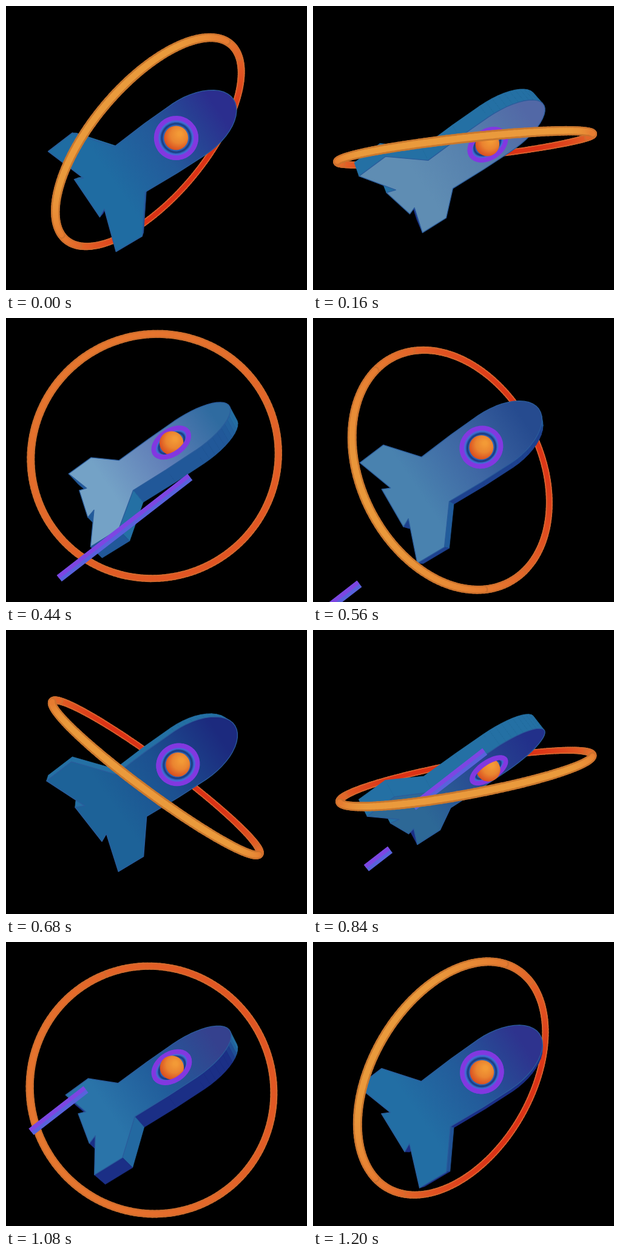
Recreate the animation shown at these times as an HTML page with a canvas. Size 496 px wide and 468 px high, loop 1240 ms.

```html
<!DOCTYPE html>
<html lang="en">
<head>
<meta charset="utf-8">
<title>Rocket</title>
<style>
html, body { margin: 0; height: 100%; overflow: hidden; background: #000; }
canvas { display: block; }
</style>
</head>
<body>
<canvas id="stage" width="496" height="468"></canvas>
<script>
const ctx = document.getElementById('stage').getContext('2d');
const LOOP = 1240, STEP = 40, DEPTH = 800, EYE = [251, 238];
const HALF_THICK = 16, RING_RADIUS = 205;

// Vectors and colours
const clamp = x => Math.max(0, Math.min(1, x));
const sum = (...terms) => [0, 1, 2].map(i => terms.reduce((acc, [k, v]) => acc + k * v[i], 0));
const unit = v => sum([1 / Math.hypot(...v), v]);
const cross = (a, b) => [a[1] * b[2] - a[2] * b[1], a[2] * b[0] - a[0] * b[2], a[0] * b[1] - a[1] * b[0]];
const rgb = hex => [1, 3, 5].map(i => parseInt(hex.slice(i, i + 2), 16));
const mix = (a, b, k) => `rgb(${rgb(a).map((c, i) => Math.round(c + (rgb(b)[i] - c) * k))})`;

function project([x, y, z]) {
  const k = DEPTH / (DEPTH - z);
  return [EYE[0] + (x - EYE[0]) * k, EYE[1] + (y - EYE[1]) * k, z, k];
}
const area = pts => pts.reduce((acc, p, i) => {
  const q = pts[(i + 1) % pts.length];
  return acc + p[0] * q[1] - q[0] * p[1];
}, 0);

function trace(pts, close) {
  ctx.beginPath();
  pts.forEach(p => ctx.lineTo(p[0], p[1]));
  if (close) ctx.closePath();
}
function fill(pts, style) {
  trace(pts, true);
  ctx.fillStyle = style;
  ctx.fill();
}
function stroke(pts, style, width, close) {
  trace(pts, close);
  ctx.strokeStyle = style;
  ctx.lineWidth = width;
  ctx.stroke();
}

// Rocket: flat outline (along the axis, across it), extruded and spun about the axis
const CENTER = [280.4, 217.4, 0];
const AXIS = [.828, -.56, .05], ACROSS = [.56, .828, 0], TOWARD = [-.041, .028, 1];
const side = [[-179, 38], [-165, 31], [-189, 101], [-138, 103.7], [-92.6, 45.5], [-30, 49]];
for (let i = 0; i < 12; i++) {
  const a = i / 12 * Math.PI / 2;
  side.push([25 + 88 * Math.sin(a), 50 * Math.cos(a)]);
}
const OUTLINE = [...side, [113, 0], ...side.map(([s, t]) => [s, -t]).reverse()]
  .map(p => p.map(c => c * .98));

// time, then face colour at fins, body and nose
const FACE = [
  [0, '#1f6ca2', '#235a9a', '#2b2e8e'],
  [280, '#8fa6c0', '#7d9cbc', '#6f94b8'],
  [440, '#74a2c6', '#6280b8', '#2f6ba0'],
  [680, '#1d6298', '#1c5090', '#1c2a7e'],
  [840, '#2d6896', '#284c92', '#22308a'],
  [1000, '#2f78ac', '#205e9c', '#3a4a8e'],
  [1240, '#1f6ca2', '#235a9a', '#2b2e8e']
];
function faceColours(t) {
  const i = FACE.findIndex(key => key[0] > t);
  const [a, b] = [FACE[i - 1], FACE[i]];
  const k = (t - a[0]) / (b[0] - a[0]);
  return [1, 2, 3].map(j => mix(a[j], b[j], k));
}

function drawRocket(t) {
  const angle = 2 * Math.PI * t / LOOP, c = Math.cos(angle), sn = Math.sin(angle);
  const wide = sum([c, ACROSS], [-sn, TOWARD]);
  const normal = sum([sn, ACROSS], [c, TOWARD]);
  const place = (s, w, h) => project(sum([1, CENTER], [s, AXIS], [w, wide], [h, normal]));
  const face = h => OUTLINE.map(([s, w]) => place(s, w, h));
  const front = face(HALF_THICK), back = face(-HALF_THICK);
  const facing = area(front) < 0 ? 1 : -1;

  function drawWindow(dir) {
    const near = sn > 0 ? -1 : 1;
    const arc = (r, h, from, to) => Array.from({ length: 41 }, (_, i) => {
      const a = (from + i / 40 * (to - from)) * Math.PI;
      return place(r * Math.cos(a), near * r * Math.sin(a), dir * h);
    });
    const circle = (r, h) => arc(r, h, 0, 2);
    fill(circle(33, 17), '#2a62b4');
    stroke(circle(23, 17), '#1c3f88', 3, true);
    stroke(circle(28, 18), '#4a66d8', 4, true);
    stroke(circle(32, 19), '#8238e0', 7.5, true);

    // Only the part of the ball outside the hull shows
    const [x, y, , k] = place(0, 0, dir * 17), r = 19.5 * k;
    const shade = ctx.createRadialGradient(x + 6, y - 7, 3, x + 3, y - 3, r * 1.35);
    shade.addColorStop(0, '#f39a36');
    shade.addColorStop(.45, '#ea8430');
    shade.addColorStop(1, '#d5401c');
    ctx.save();
    trace([...arc(32, 18, 0, 1), ...arc(32, 80, 1, 2)], true);
    ctx.clip();
    ctx.beginPath();
    ctx.arc(x, y, r, 0, 7);
    ctx.fillStyle = shade;
    ctx.fill();
    ctx.restore();
    stroke(arc(32, 20, 0, 1), '#8238e0', 7.5);
  }

  drawWindow(-facing);

  const glow = clamp(1 - Math.abs(t - 400) / 250);
  OUTLINE.map((p, i) => {
    const j = (i + 1) % OUTLINE.length, q = OUTLINE[j];
    const out = unit(sum([p[1] - q[1], AXIS], [q[0] - p[0], wide]));
    return {
      pts: [front[j], front[i], back[i], back[j]],
      z: front[i][2] + front[j][2] + back[i][2] + back[j][2],
      colour: mix('#2470a4', '#1b2f86', clamp(.3 + out[1] * 2.5) * (1 - .75 * glow))
    };
  }).filter(q => area(q.pts) < 0).sort((a, b) => a.z - b.z).forEach(q => {
    fill(q.pts, q.colour);
    stroke(q.pts, q.colour, .8, true);
  });

  const tail = place(-170, 0, 0), nose = place(110, 0, 0);
  const tint = ctx.createLinearGradient(tail[0], tail[1], nose[0], nose[1]);
  faceColours(t).forEach((colour, i) => tint.addColorStop([.15, .5, .9][i], colour));
  const shown = facing > 0 ? front : back;
  fill(shown, tint);
  stroke(shown, '#2a5c9c', 1.3, true);
  drawWindow(facing);
}

// Ring: its plane normal over half a loop; the other half mirrors it vertically
const TILT = [
  [-40, .68, .4, .61], [0, .69, .58, .43], [60, .59, .8, .12], [220, -.18, .975, .12],
  [280, -.3, .866, .4], [380, -.13, .51, .85], [440, .12, .2, .97],
  [580, .68, -.4, .61], [620, .69, -.58, .43], [680, .59, -.8, .12]
];
function ringNormal(t) {
  const p = t % 620;
  const i = TILT.findIndex(key => key[0] > p) - 1;
  const [a, b, c, d] = TILT.slice(i - 1, i + 3);
  const span = c[0] - b[0], k = (p - b[0]) / span;
  const n = [1, 2, 3].map(j => {
    const m0 = (c[j] - a[j]) / (c[0] - a[0]) * span;
    const m1 = (d[j] - b[j]) / (d[0] - b[0]) * span;
    return (1 + 2 * k) * (1 - k) ** 2 * b[j] + k * (1 - k) ** 2 * m0
      + k * k * (3 - 2 * k) * c[j] + k * k * (k - 1) * m1;
  });
  if (t >= 620) n[1] = -n[1];
  return unit(n);
}
function ringPoints(t) {
  const n = ringNormal(t), u = unit([-n[1], n[0], 0]), v = cross(n, u);
  return Array.from({ length: 180 }, (_, i) => {
    const a = i / 90 * Math.PI;
    return project(sum([1, [...EYE, 0]], [RING_RADIUS * Math.cos(a), u], [RING_RADIUS * Math.sin(a), v]));
  });
}
function drawRing(pts, from, to) {
  const parts = pts.map((p, i) => [p, pts[(i + 1) % pts.length]])
    .filter(([p]) => p[2] >= from && p[2] < to);
  ctx.lineCap = 'round';
  for (const [far, near, width] of [['#d9602e', '#c9782e', 12.5], ['#dc3216', '#ea9a3c', 8]]) {
    for (const part of parts) {
      const k = clamp(.5 + part[0][2] / 300);
      stroke(part, mix(far, near, k), width * part[0][3]);
    }
  }
  ctx.lineCap = 'butt';
}

// Streaks grow at x = start, travel down-left and vanish at x = end
const STREAKS = [
  { born: 205, start: 532, y: 85, speed: 1.89, life: 114, end: -60 },
  { born: 703, start: 330, y: 164, speed: 1.2, life: 98, end: -60 },
  { born: 700, start: 300, y: 228, speed: 1.9, life: 49, end: 88 },
  { born: 848, start: 320, y: 97, speed: 1.2, life: 75, end: -60 }
];
function drawStreak({ born, start, y, speed, life, end }, t) {
  if (t <= born) return;
  const head = Math.max(end, start - speed * (t - born));
  const tail = start - speed * Math.max(0, t - born - life);
  if (tail <= head) return;
  const line = (dx, dy) => [head, tail].map(x => [x + dx, y + (start - x) * .775 + dy]);
  stroke(line(0, 0), '#5862dc', 13);
  stroke(line(-2, -2.5), '#7d46e2', 7);
}

function draw(now) {
  const t = Math.floor(now % LOOP / STEP) * STEP;
  const ring = ringPoints(t);
  ctx.fillStyle = '#000';
  ctx.fillRect(0, 0, 496, 468);
  ctx.lineJoin = 'round';
  drawRing(ring, -Infinity, 0);
  drawRocket(t);
  drawRing(ring, 0, 60);
  STREAKS.forEach(s => drawStreak(s, t));
  drawRing(ring, 60, Infinity);
}

let begin;
function tick(now) {
  begin ??= now;
  draw(now - begin);
  requestAnimationFrame(tick);
}
requestAnimationFrame(tick);
</script>
</body>
</html>
```
